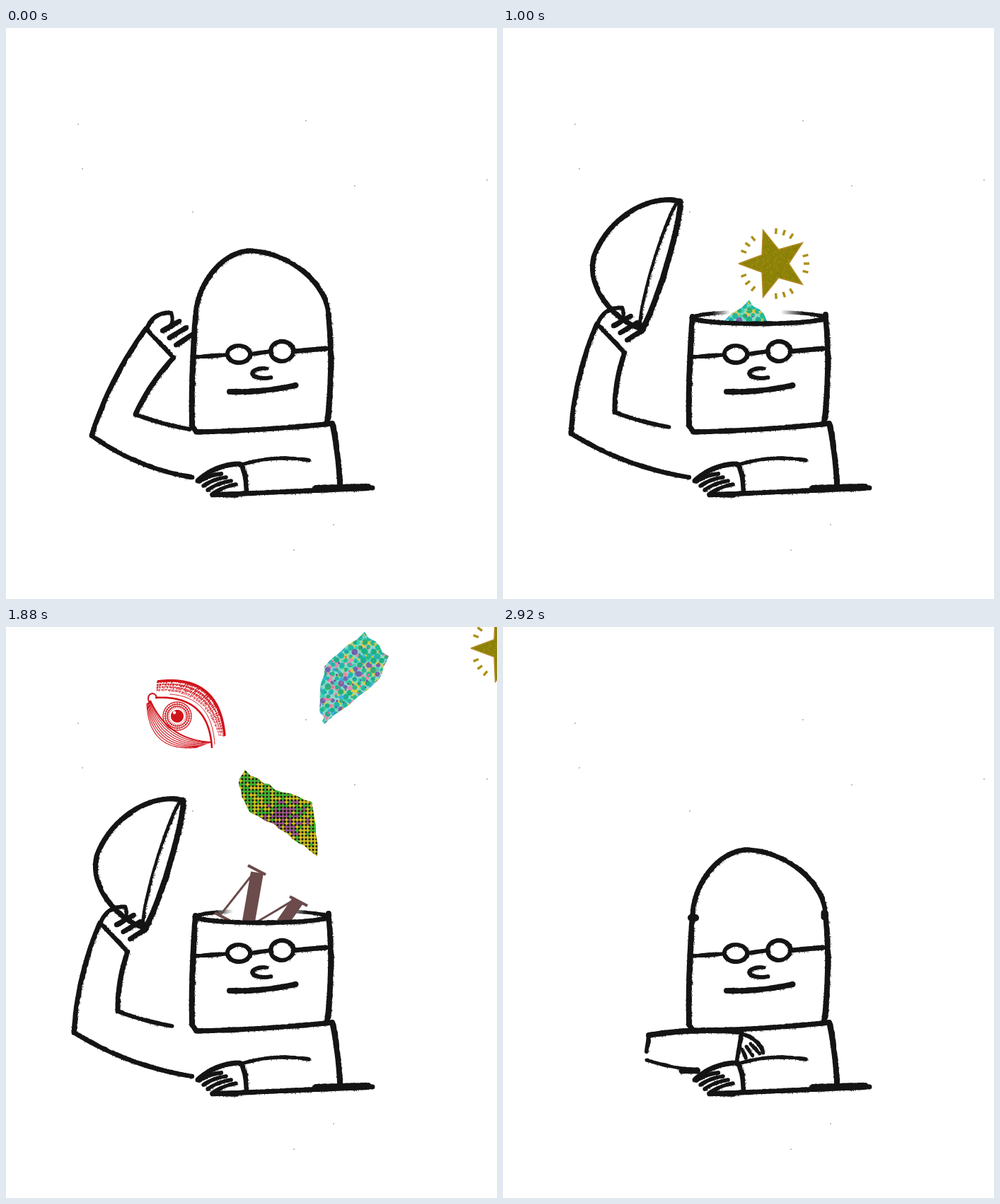
An HTML page with a canvas that plays this animation: 694x807 px, repeating every 3050 ms.

```html
<!DOCTYPE html>
<html lang="en">
<head>
<meta charset="utf-8">
<title>Open mind</title>
<style>
html, body { margin: 0; width: 100%; height: 100%; overflow: hidden; background: #fff; }
canvas { display: block; width: 694px; height: 807px; }
</style>
</head>
<body>
<canvas id="stage" width="694" height="807"></canvas>
<script>
const ctx = document.getElementById('stage').getContext('2d');
const INK = '#141414', RED = '#d0141c', TAU = Math.PI * 2;
const LOOP = 3050, LAST_STEP = 24;

// Most steps hold for 130 ms, a few are shorter.
function stepAt(time) {
  const short = { 0: 60, 1: 60, 7: 100, 14: 100 };
  let step = 0;
  for (let end = 0; step < LAST_STEP; step++) {
    end += short[step] ?? 130;
    if (time < end) break;
  }
  return step;
}

const lerp = (a, b, t) => a + (b - a) * t;
const mix = (p, q, t) => p.map((v, i) => lerp(v, q[i], t));

// Values between keys of the form [step, ...values]
function sample(keys, step) {
  const next = Math.max(1, keys.findIndex(key => key[0] >= step));
  const a = keys[next - 1], b = keys[next];
  return mix(a, b, (step - a[0]) / (b[0] - a[0])).slice(1);
}

function random(seed) {
  return () => {
    seed = (seed * 1664525 + 1013904223) >>> 0;
    return seed / 4294967296;
  };
}

// Curve between two points, bent to the left of its direction by sag
function bow(x1, y1, x2, y2, sag = 0) {
  const dx = x2 - x1, dy = y2 - y1, len = Math.hypot(dx, dy), n = Math.ceil(len);
  return Array.from({ length: n + 1 }, (_, i) => {
    const t = i / n, off = 4 * t * (1 - t) * sag / len;
    return [x1 + dx * t + dy * off, y1 + dy * t - dx * off];
  });
}

function oval(x, y, rx, ry, from = 0, to = TAU) {
  const n = Math.ceil(Math.max(rx, ry) * Math.abs(to - from));
  return Array.from({ length: n + 1 }, (_, i) => {
    const a = lerp(from, to, i / n);
    return [x + rx * Math.cos(a), y + ry * Math.sin(a)];
  });
}

// Rough crayon line: slowly wandering width with loose grain at the edges
function crayon(points, width) {
  const rnd = random(Math.round(points[0][0] * 31 + points[0][1] * 17 + width));
  let wobble = 0;
  ctx.fillStyle = INK;
  ctx.beginPath();
  for (const [x, y] of points) {
    wobble = wobble * 0.8 + (rnd() - 0.5) * 0.5;
    const r = width / 2 + wobble * 0.7, a = rnd() * TAU;
    ctx.moveTo(x + wobble + r, y);
    ctx.arc(x + wobble, y, r, 0, TAU);
    if (rnd() < 0.5) ctx.rect(x + Math.cos(a) * (r + 0.6), y + Math.sin(a) * (r + 0.6), 1, 1);
  }
  ctx.fill();
}
const stroke = (width, ...ends) => crayon(bow(...ends), width);

function trace(points) {
  ctx.beginPath();
  for (const [x, y] of points) ctx.lineTo(x, y);
}
function line(points, width, color) {
  trace(points);
  ctx.strokeStyle = color;
  ctx.lineWidth = width;
  ctx.stroke();
}
function fillShape(points, color) {
  trace(points);
  ctx.fillStyle = color;
  ctx.fill();
}
const dot = (x, y, r, color) => fillShape(oval(x, y, r, r), color);

// Lid corner, lid angle, wrist, elbow
const CLOSED = [268, 410, -1.5, 198, 425, 121, 576];
const RAISED = [245, 385, -54.6, 177, 362, 112, 554];
const ASIDE = [195, 425, -73.3, 133, 418, 96, 573];
const RETURN = [222, 405, -55.5, 170, 405, 117, 554];
const POSES = [[0, CLOSED], [4, RAISED], [6, ASIDE], [17, ASIDE], [19, RETURN], [20, RAISED], [23, CLOSED]]
  .map(([step, pose]) => [step, ...pose]);

function drawLid(x, y, degrees, open) {
  const a = degrees * Math.PI / 180, c = Math.cos(a), s = Math.sin(a);
  const place = list => list.map(([u, v]) => [x + u * c - v * s, y + u * s + v * c]);
  const peak = 77, width = 188, power = 1.8;
  const dome = oval(0, 0, 1, 1, Math.PI, TAU).length && Array.from({ length: 301 }, (_, i) => {
    const angle = Math.PI * i / 300, u = Math.cos(angle), reach = u > 0 ? peak : width - peak;
    const out = Math.abs(u) ** (2 / power), up = Math.sin(angle) ** (2 / power);
    return [peak - Math.sign(u) * out * reach, -93 * up];
  });
  crayon(place(dome), 7);
  if (!open) return;
  crayon(place(oval(94, 0, 94, 9, 0, Math.PI)), 8);
  crayon(place(oval(94, 0, 93, 10, Math.PI, TAU)), 4.5);
}

function drawArm(wx, wy, ex, ey) {
  const cuff = [wx + 39, wy + 41], crook = [ex + 62, ey - 30];
  stroke(7, wx, wy, ex, ey, -7);
  stroke(6.5, ex, ey, 263, 635, -9);
  stroke(7, ...cuff, ...crook, -4);
  stroke(6, ...crook, crook[0] + 77, crook[1] + 21, -2);
  stroke(6, wx, wy, ...cuff);
  drawHand(wx, wy, ...cuff);
}

function drawHand(x1, y1, x2, y2) {
  const len = Math.hypot(x2 - x1, y2 - y1), dx = (x2 - x1) / len, dy = (y2 - y1) / len;
  const at = (along, out) => [x1 + along * dx + out * dy, y1 + along * dy - out * dx];
  stroke(6, ...at(0, 2), ...at(8, 41), 7);
  stroke(5, ...at(8, 41), ...at(20, 16), 6);
  for (let finger = 0; finger < 3; finger++)
    stroke(7, ...at(18 + finger * 14, 15), ...at(25 + finger * 13, 42));
}

function drawRestingArm() {
  stroke(8, 206, 577, 337, 572, 4);
  stroke(6, 206, 577, 203, 600);
  stroke(5, 203, 612, 272, 626, -2);
  stroke(9, 253, 627, 274, 627);
  stroke(6, 337, 573, 331, 612);
  stroke(5.5, 340, 576, 368, 602, 5);
  for (let finger = 0; finger < 3; finger++)
    stroke(5, 338 + finger * 6, 597 - finger * 4, 343 + finger * 10, 609 - finger * 3);
}

function drawFace() {
  stroke(6, 268, 465, 312, 462);
  crayon(oval(329, 461, 16, 12), 6);
  stroke(6, 346, 461, 374, 457);
  crayon(oval(390, 457, 16, 14), 6);
  stroke(7, 407, 457, 452, 453);
  crayon(oval(365, 488, 17, 7, 1, 5), 5.5);
  stroke(8, 316, 514, 409, 505, -3);
}

function drawBody() {
  stroke(8, 268, 408, 263, 562, -2);
  stroke(7, 263, 562, 269, 571);
  stroke(8, 456, 405, 454, 557, 4);
  stroke(7, 269, 571, 461, 559, -2);
  stroke(8, 461, 559, 472, 648, 2);
  stroke(5, 330, 618, 428, 611, 6);
  stroke(7, 333, 617, 340, 657, 2);
  stroke(7, 292, 660, 518, 650);
  stroke(10, 438, 651, 512, 649);
  stroke(7, 271, 640, 330, 616, 6);
  for (let finger = 0; finger < 4; finger++)
    stroke(5.5, 273 + finger * 6, 641 + finger * 6, 304 + finger * 7, 630 + finger * 5, 2);
  stroke(8, 294, 659, 326, 660);
}

function drawSpecks() {
  for (const [x, y] of [[108, 199], [102, 136], [264, 260], [424, 131], [493, 223], [680, 215], [463, 702], [407, 738]])
    dot(x, y, 0.8, '#777');
}

function drawStar() {
  const rnd = random(9), speckles = ['#a88a10', '#747c08', '#a39a12', '#b58425'];
  const polar = (r, turn) => [r * Math.cos(turn * TAU), r * Math.sin(turn * TAU)];
  const star = Array.from({ length: 11 }, (_, k) => polar(k % 2 ? 21 : 50, 0.5 + k / 10));
  ctx.save();
  fillShape(star, '#8d8208');
  line(star, 1.5, '#b58a24');
  ctx.clip();
  for (let k = 0; k < 700; k++) {
    ctx.fillStyle = speckles[k % 4];
    ctx.fillRect(rnd() * 104 - 52, rnd() * 104 - 52, 1.4, 1.4);
  }
  ctx.restore();
  for (let k = 0; k < 5; k++)
    for (const spread of [-0.04, 0, 0.04]) {
      const turn = 0.6 + k / 5 + spread;
      line([polar(42, turn), polar(50, turn)], 3.4, '#ac8f18');
    }
}

// Torn paper: ragged edges between a few corners
function torn(corners, seed) {
  const rnd = random(seed), edge = [];
  corners.forEach((a, i) => {
    const b = corners[(i + 1) % corners.length];
    for (let t = 0; t < 1; t += 0.2) {
      const [x, y] = mix(a, b, t), loose = t ? 5 : 0;
      edge.push([x + (rnd() - 0.5) * loose, y + (rnd() - 0.5) * loose]);
    }
  });
  return edge;
}

function drawTealScrap() {
  const rnd = random(4);
  const mesh = (size, r, tilt, colors) => {
    for (let v = -15; v <= 15; v++)
      for (let u = -15; u <= 15; u++) {
        const x = 375 + (u * Math.cos(tilt) - v * Math.sin(tilt)) * size;
        const y = 266 + (u * Math.sin(tilt) + v * Math.cos(tilt)) * size;
        dot(x + rnd() * 2, y + rnd() * 2, r * (0.7 + rnd() * 0.5), colors[Math.floor(rnd() * colors.length)]);
      }
  };
  ctx.save();
  fillShape(torn([[390, 201], [424, 235], [410, 268], [333, 331], [326, 313], [333, 250]], 5), '#8fd8c4');
  ctx.clip();
  mesh(8, 3.4, 0.4, ['#e58cae', '#d9cc45', '#3cb2dc', '#3fd2b4']);
  mesh(9, 3.7, 0.8, ['#1cb184', '#25bd8c', '#2fae70', '#21b8a4', '#7465a8']);
  mesh(9, 1.5, 0.2, ['#e3c53c', '#d96c9a', '#2b9cc8', '#7152a0']);
  ctx.restore();
}

function drawOliveScrap() {
  const rnd = random(7);
  ctx.save();
  fillShape(torn([[338, 202], [380, 230], [432, 247], [440, 324], [398, 292], [345, 262], [329, 222]], 8), '#a9b51e');
  ctx.clip();
  for (let y = 195; y < 330; y += 5)
    for (let x = 324; x < 446; x += 5) {
      const shade = Math.max(0, 1 - Math.hypot(x - 390, (y - 268) * 1.3) / 40);
      const green = rnd() < 0.85 - (y - 200) / 140;
      dot(x + 2.5, y + 2.5, 2.3, rnd() < shade ? '#a552a5' : green ? '#35b838' : '#d2bd20');
      dot(x, y, 1.6 + shade * 0.4, '#1d1a10');
    }
  ctx.restore();
}

function drawEye() {
  const rnd = random(3);
  const browTop = bow(214, 77, 309, 154, 32), browBase = bow(213, 92, 299, 152, 20);
  const upper = bow(211, 100, 291, 171, 27), lower = bow(204, 104, 290, 163, -16);
  const cheek = bow(199, 108, 272, 170, -26);
  const along = (curve, t) => curve[Math.floor(t * (curve.length - 1))];
  fillShape([...browTop, ...cheek.slice().reverse()], '#fff');
  for (let k = 0; k <= 80; k++) {
    const a = along(browTop, k / 80), b = along(browBase, k / 80);
    for (let from = 0; from < 0.95; from += 0.24)
      line([mix(a, b, from), mix(a, b, from + 0.1 + rnd() * 0.13)], 1.6 - from, RED);
  }
  for (let k = 0; k < 8; k++)
    line(lower.map((p, i) => mix(p, along(cheek, i / lower.length), k / 7)), 1.1, RED);
  line(browTop, 3.5, RED);
  line(upper, 2.6, RED);
  line(lower, 2, RED);
  line(upper.slice(12).map(([x, y]) => [x + 4, y - 5]), 1, RED);
  line(oval(207, 101, 6, 7, 2, 6.3), 2, RED);
  for (const r of [20, 17, 14]) line(oval(242, 126, r, r), 1.3, RED);
  for (let k = 0; k < 32; k++) {
    const c = Math.cos(k / 32 * TAU), s = Math.sin(k / 32 * TAU);
    line([[242 + 11 * c, 126 + 11 * s], [242 + 19 * c, 126 + 19 * s]], 0.8, RED);
  }
  dot(242, 126, 9, RED);
  dot(238, 121, 2.2, '#fff');
}

function drawLetter() {
  const bar = (width, ...ends) => line(bow(...ends), width, '#6b4b4b');
  bar(18, 398, 104, 384, 184);
  bar(17, 456, 143, 411, 208);
  bar(3, 391, 107, 346, 164);
  bar(3, 379, 185, 453, 141);
  for (const [x, y] of [[385, 94], [338, 161], [444, 138], [395, 203]]) bar(4, x, y, x + 25, y + 13);
}

// Flights as [step, x, y]
const ITEMS = [
  [drawStar, [[8, 338, 385], [9, 383, 333], [12, 518, 194], [15, 622, 79], [16, 707, 30]]],
  [drawTealScrap, [[8, -56, 245], [12, 0, 0], [16, 117, -194], [18, 175, -291]]],
  [drawEye, [[11, 139, 335], [16, 0, 0], [18, -56, -134]]],
  [drawOliveScrap, [[14, 27, 172], [16, 0, 0], [19, -40, -257]]],
  [drawLetter, [[16, -43, 243], [19, 0, 0], [21, 0, -162]]]
];

function drawItems(step) {
  ctx.save();
  ctx.beginPath();
  ctx.rect(0, 0, 694, 416);
  ctx.clip();
  for (const [draw, flight] of ITEMS) {
    if (step < flight[0][0] || step > flight.at(-1)[0]) continue;
    ctx.save();
    ctx.translate(...sample(flight, step));
    draw();
    ctx.restore();
  }
  ctx.restore();
}

function drawBackRim(step) {
  crayon(oval(361, 410, 94, 9, Math.PI, TAU), 5);
  if (step < 8 || step > 18) return;
  const fade = ctx.createLinearGradient(295, 0, 425, 0);
  for (const [stop, color] of [[0, '#fff0'], [0.2, '#fff'], [0.75, '#fff'], [1, '#fff0']]) fade.addColorStop(stop, color);
  ctx.fillStyle = fade;
  ctx.fillRect(295, 392, 130, 18);
}

function render(step) {
  const resting = step === LAST_STEP, open = step > 0 && step < 23;
  ctx.fillStyle = '#fff';
  ctx.fillRect(0, 0, 694, 807);
  drawSpecks();
  if (open) {
    drawBackRim(step);
    drawItems(step);
    crayon(oval(361, 409, 94, 9, 0, Math.PI), 6.5);
  }
  drawBody();
  drawFace();
  const [x, y, angle, ...arm] = resting ? CLOSED : sample(POSES, step);
  drawLid(x, y, angle, open);
  if (resting) {
    stroke(10, 266, 411, 272, 411);
    stroke(9, 454, 404, 454, 410);
    drawRestingArm();
  } else {
    drawArm(...arm);
  }
}

let shown = -1;
function tick() {
  const step = stepAt(performance.now() % LOOP);
  if (step !== shown) render(shown = step);
  requestAnimationFrame(tick);
}
tick();
</script>
</body>
</html>
```
